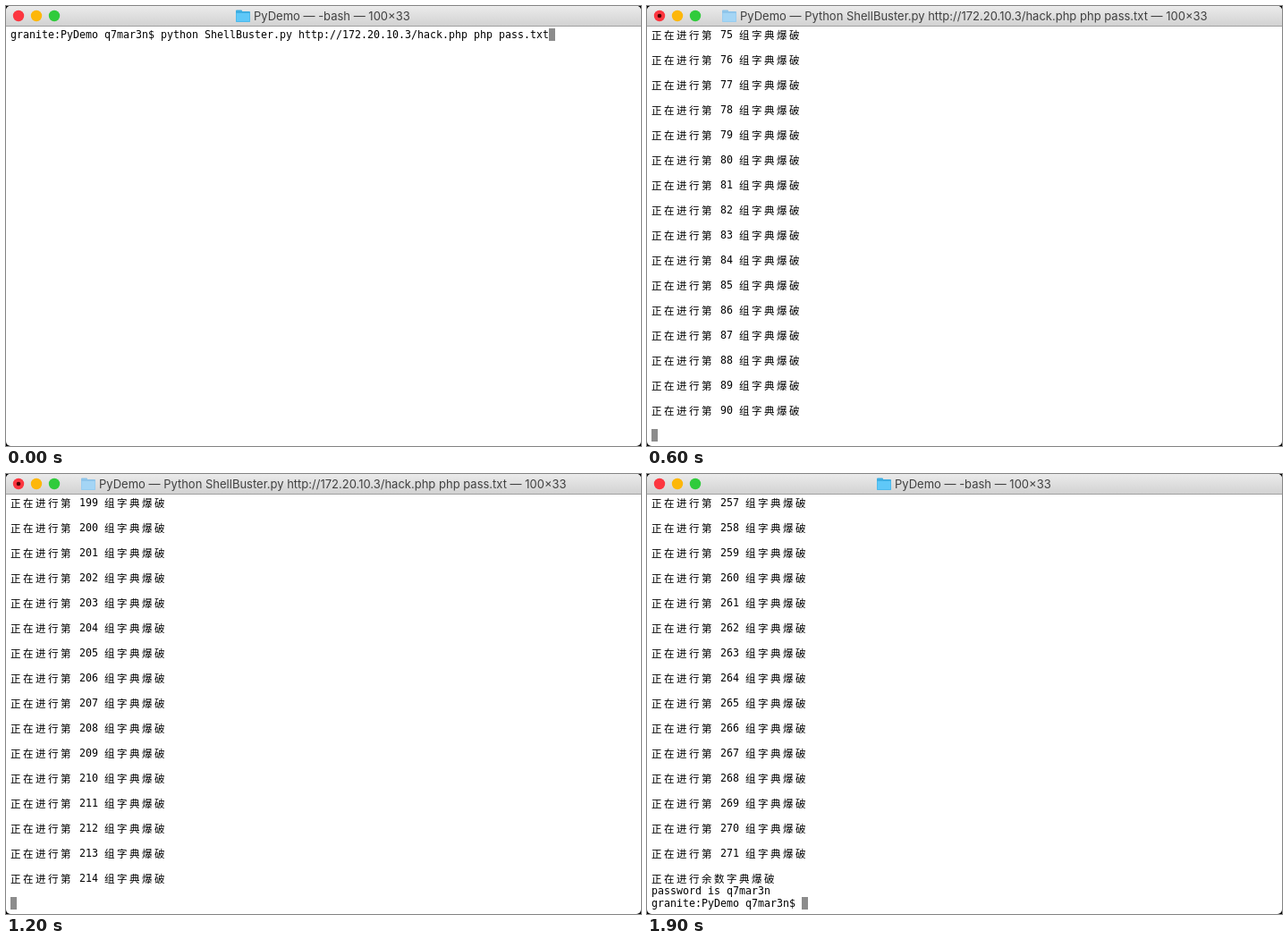
Write an HTML page with a canvas that moves like this. It is 710 px wide and 492 px high and loops after 2 s.

```html
<!DOCTYPE html>
<html lang="zh">
<head>
<meta charset="utf-8">
<title>Terminal</title>
<style>
  html, body { margin: 0; width: 100%; height: 100%; overflow: hidden; background: #000; }
  canvas { display: block; }
</style>
</head>
<body>
<canvas id="stage" width="710" height="492"></canvas>
<script>
const ctx = document.getElementById('stage').getContext('2d');
const LOOP = 2000, STEP = 100;
const COL = 7, ROW = 14, LEFT = 5, TOP = 25, ROWS = 33;
const LATIN = '11.6px "DejaVu Sans Mono", monospace';
const HAN = '500 11.5px "Noto Sans CJK SC", "Noto Sans CJK", sans-serif';
const TITLE = '13px Inter, sans-serif';

const PROMPT = 'granite:PyDemo q7mar3n$ ';
const SCRIPT = 'ShellBuster.py http://172.20.10.3/hack.php php pass.txt';
const COMMAND = PROMPT + 'python ' + SCRIPT;
const HEADER = ['当前字典中变量个数为：271263', '字典将被分割为 271 份'];
const FOOTER = ['正在进行余数字典爆破', 'password is q7mar3n', PROMPT];
const GROUPS = 271, DONE = 1500;

// [time, groups tried so far]
const PROGRESS = [[200, 0], [300, 6], [400, 34], [700, 118], [1000, 163], [1400, 265], [DONE, GROUPS]];

function groupsAt(time) {
  if (time <= PROGRESS[0][0]) return 0;
  if (time >= DONE) return GROUPS;
  const i = PROGRESS.findIndex(([t]) => t >= time);
  const [t0, n0] = PROGRESS[i - 1], [t1, n1] = PROGRESS[i];
  return Math.round(n0 + (n1 - n0) * (time - t0) / (t1 - t0));
}

// The last line is the one that holds the cursor.
function linesAt(time) {
  const lines = [COMMAND];
  if (time < 100) return lines;
  if (time >= 200) lines.push(...HEADER);
  for (let n = 1; n <= groupsAt(time); n++) lines.push(`正在进行第 ${n} 组字典爆破`, '');
  return lines.concat(time >= DONE ? FOOTER : '');
}

function disc(x, y, r, color) {
  ctx.fillStyle = color;
  ctx.beginPath();
  ctx.arc(x, y, r, 0, 2 * Math.PI);
  ctx.fill();
}

function folder(x, body, tab) {
  ctx.fillStyle = tab;
  ctx.beginPath();
  ctx.roundRect(x, 4.5, 7, 5, 1);
  ctx.roundRect(x, 6, 16, 12, 1);
  ctx.fill();
  ctx.fillStyle = body;
  ctx.fillRect(x + 0.5, 8, 15, 9.5);
}

function titleBar(running) {
  const shade = ctx.createLinearGradient(0, 0, 0, 22);
  shade.addColorStop(0, '#ebebeb');
  shade.addColorStop(1, '#d2d2d2');
  ctx.fillStyle = shade;
  ctx.fillRect(0, 0, 710, 22);
  ctx.fillStyle = '#a0a0a0';
  ctx.fillRect(0, 22, 710, 1);
  ['#fc3640', '#fdb70a', '#30cb3c'].forEach((color, i) => disc(14 + 20 * i, 11, 6.2, color));
  if (running) disc(14, 11, 2.3, '#4d0000');

  const x = running ? 84 : 257;
  if (running) folder(x, '#a4d5f5', '#8fc5ea');
  else folder(x, '#5fc8f8', '#3eaee2');
  ctx.font = TITLE;
  ctx.fillStyle = '#404040';
  ctx.fillText(`PyDemo — ${running ? 'Python ' + SCRIPT : '-bash'} — 100×33`, x + 20, 16);
}

// Draws one line on the character grid and returns the x after it.
function typeLine(text, row) {
  let x = LEFT;
  const base = TOP + row * ROW + 11;
  ctx.fillStyle = '#000';
  for (const ch of text) {
    const wide = ch > '\u2fff';
    ctx.font = wide ? HAN : LATIN;
    ctx.fillText(ch, x, wide ? base + 0.5 : base);
    x += wide ? 2 * COL : COL;
  }
  return x;
}

function brackets() {
  ctx.strokeStyle = '#aaa';
  ctx.lineWidth = 1;
  for (const [x, dx] of [[2.5, 2], [707.5, -2]]) {
    ctx.beginPath();
    ctx.moveTo(x + dx, 27.5);
    ctx.lineTo(x, 27.5);
    ctx.lineTo(x, 37.5);
    ctx.lineTo(x + dx, 37.5);
    ctx.stroke();
  }
}

function draw(time) {
  const running = time >= 100 && time < DONE;
  ctx.fillStyle = '#000';
  ctx.fillRect(0, 0, 710, 492);
  ctx.save();
  ctx.beginPath();
  ctx.roundRect(0, 0, 710, 492, 5);
  ctx.clip();
  ctx.fillStyle = '#fff';
  ctx.fillRect(0, 0, 710, 492);
  titleBar(running);

  const lines = linesAt(time).slice(-ROWS);
  if (running && lines[0] === COMMAND) brackets();
  let x = LEFT;
  lines.forEach((line, row) => { x = typeLine(line, row); });
  ctx.fillStyle = '#8c8c8c';
  ctx.fillRect(x, TOP + (lines.length - 1) * ROW, COL, ROW);
  ctx.restore();
}

const start = performance.now();
function tick() {
  const time = (performance.now() - start) % LOOP;
  draw(Math.floor(time / STEP) * STEP);
  requestAnimationFrame(tick);
}
tick();
</script>
</body>
</html>
```
